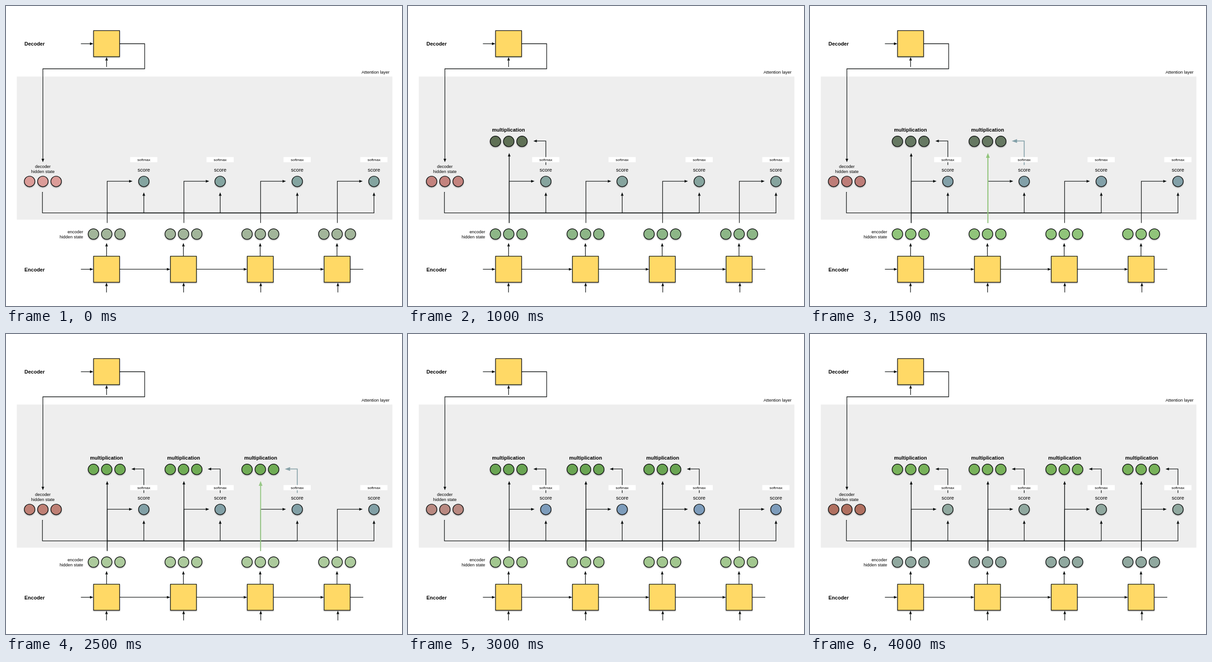
An HTML page that plays this animation: 859 by 652 pixels, repeating every 5 s.

```html
<!DOCTYPE html>
<html lang="en">
<head>
<meta charset="utf-8">
<title>Attention layer</title>
<style>
html, body { margin: 0; width: 100%; height: 100%; overflow: hidden; background: #fff; }
svg { display: block; }
text { font-family: "Liberation Sans", Arial, sans-serif; fill: #000; }
</style>
</head>
<body>
<svg id="stage" width="859" height="652" viewBox="0 0 859 652">
  <defs>
    <filter id="shadow" x="-30%" y="-30%" width="160%" height="170%">
      <feDropShadow dx="0" dy="1.3" stdDeviation="1" flood-color="#000" flood-opacity=".4"/>
    </filter>
  </defs>
</svg>
<script>
const stage = document.getElementById('stage');
const INK = '#0c1010';
const STEP = 500, LOOP = 5000, LAST = 8;

// Circle colours per step: decoder, score, encoder, product
const palette = [
  ['#db9c98', '#84a4a0', '#a2b59a', '#566545'],
  ['#c98884', '#8aa994', '#8aa994', '#566545'],
  ['#c3837e', '#86a49e', '#8db687', '#5e6f54'],
  ['#bd7d78', '#82a0a8', '#90c47a', '#667862'],
  ['#be7f77', '#82a0a7', '#9ec78b', '#6b925c'],
  ['#bf8075', '#82a0a6', '#acca9c', '#6fac55'],
  ['#b98981', '#7d9cbb', '#a2c78f', '#6aa552'],
  ['#b3928c', '#7898d0', '#98c482', '#659e4e'],
  ['#b07060', '#90a89f', '#90a89f', '#78b25a']
];
// Highlighted arrows per column: upward, sideways
const glow = [
  ['#8aa994', '#8aa994'],
  ['#90c47a', '#82a0a8'],
  ['#98c887', '#88a2a8'],
  ['#90c47a', '#7898d8']
];

function add(parent, name, attrs) {
  const el = document.createElementNS('http://www.w3.org/2000/svg', name);
  for (const key in attrs) el.setAttribute(key, attrs[key]);
  parent.appendChild(el);
  return el;
}

const group = parent => add(parent, 'g', {});

function label(parent, str, x, y, size, anchor = 'middle', weight = 400) {
  add(parent, 'text', {
    x, y, 'font-size': size, 'text-anchor': anchor, 'font-weight': weight
  }).textContent = str;
}

function line(parent, points, color = INK, width = 1.3) {
  add(parent, 'polyline', {
    points: points.join(' '), fill: 'none', stroke: color, 'stroke-width': width
  });
}

// Polyline whose last point is the tip of the arrowhead
function arrow(parent, points, color = INK, width = 1.3, len = 7.5, half = 2.9) {
  const [x, y] = points[points.length - 1];
  const [px, py] = points[points.length - 2];
  const d = Math.hypot(x - px, y - py);
  const ux = (x - px) / d, uy = (y - py) / d;
  const bx = x - ux * len, by = y - uy * len;
  line(parent, [...points.slice(0, -1), [bx, by]], color, width);
  add(parent, 'polygon', {
    points: [[x, y], [bx - uy * half, by + ux * half], [bx + uy * half, by - ux * half]].join(' '),
    fill: color
  });
}

function box(x, y) {
  add(stage, 'rect', {
    x, y, width: 56.4, height: 56.6, fill: '#ffd966', stroke: INK,
    'stroke-width': 1.3, filter: 'url(#shadow)'
  });
}

const dots = [[], [], [], []];

function dot(parent, kind, cx, cy) {
  dots[kind].push(add(parent, 'circle', {
    cx, cy, r: 11.4, stroke: INK, 'stroke-width': 1.4, filter: 'url(#shadow)'
  }));
}

function trio(parent, kind, cx, cy) {
  for (const dx of [-28.8, 0, 28.8]) dot(parent, kind, cx + dx, cy);
}

add(stage, 'rect', { x: 23.5, y: 153.3, width: 814.7, height: 311, fill: '#eeeeee' });
label(stage, 'Attention layer', 832, 146.5, 9.5, 'end');
label(stage, 'Decoder', 40, 86, 11, 'start', 700);
label(stage, 'Encoder', 40, 576.5, 11, 'start', 700);

box(190, 53.5);
arrow(stage, [[162.5, 82], [189.5, 82]]);
arrow(stage, [[218.2, 132.5], [218.2, 111]]);
arrow(stage, [[246.5, 82], [300.8, 82], [300.8, 136.5], [80, 136.5], [80, 339.5]]);

label(stage, 'decoder', 80, 351.5, 9.4);
label(stage, 'hidden state', 80, 362.5, 9.4);
trio(stage, 0, 80, 381.3);
label(stage, 'encoder', 167.3, 493.5, 9.4, 'end');
label(stage, 'hidden state', 167.3, 504.7, 9.4, 'end');

line(stage, [[80, 405], [79, 405], [79, 449.6], [799, 449.6]]);
line(stage, [[219.5, 449.6], [632, 449.6]], INK, 1.6);
arrow(stage, [[162.5, 572.2], [189.5, 572.2]]);

const columns = [0, 1, 2, 3].map(i => {
  const mid = 218.5 + i * 166.6;
  const up = 219.5 + i * 166.4;
  const score = 299 + i * 166.4 - (i === 1 ? 0.8 : 0);
  const left = 190 + i * 166.7;
  const foot = 218 + i * 167.3;

  box(left, 543.8);
  const right = left + 56.5;
  if (i < 3) arrow(stage, [[right, 572.2], [left + 166.4, 572.2]]);
  else line(stage, [[right, 572.2], [775, 572.2]]);
  arrow(stage, [[foot, 622.5], [foot, 601.2]]);
  arrow(stage, [[mid - 0.3, 543.5], [mid - 0.3, 515]]);
  trio(stage, 2, mid, 495.6);

  arrow(stage, [[up, 471.5], [up, 380.8], [up + 55, 380.8]]);
  arrow(stage, [[score, 449.6], [score, 405]]);
  dot(stage, 1, score, 381.3);
  label(stage, 'score', score, 359.7, 11);

  const product = group(stage);
  label(product, 'multiplication', 218 + i * 167.2, 273, 11, 'middle', 700);
  trio(product, 3, mid, 294.2);

  const rise = [[up, 471.5], [up, 319.5]];
  const turn = [[score, 345.5], [score, 293.4], [score - 27, 293.4]];
  const calm = group(stage);
  arrow(calm, rise, INK, 1.5);
  arrow(calm, turn);
  const lit = group(stage);
  arrow(lit, rise, glow[i][0], 2.2, 10.5, 4.1);
  arrow(lit, turn, glow[i][1], 1.8, 11.5, 4.1);

  add(stage, 'rect', { x: score - 29.7, y: 328.3, width: 59, height: 11.2, fill: '#fff' });
  label(stage, 'softmax', score, 336.6, 8);
  return { product, calm, lit };
});

function show(el, on) {
  el.setAttribute('visibility', on ? 'visible' : 'hidden');
}

let current = -1;

function draw(time) {
  const step = Math.min(LAST, Math.floor((time % LOOP) / STEP));
  if (step === current) return;
  current = step;
  dots.forEach((list, kind) =>
    list.forEach(el => el.setAttribute('fill', palette[step][kind])));
  columns.forEach((col, i) => {
    const start = i * 2 + 1;
    show(col.product, step >= start);
    show(col.lit, step === start);
    show(col.calm, step > start);
  });
}

const begin = performance.now();

function tick() {
  draw(performance.now() - begin);
  requestAnimationFrame(tick);
}

draw(0);
requestAnimationFrame(tick);
</script>
</body>
</html>
```
